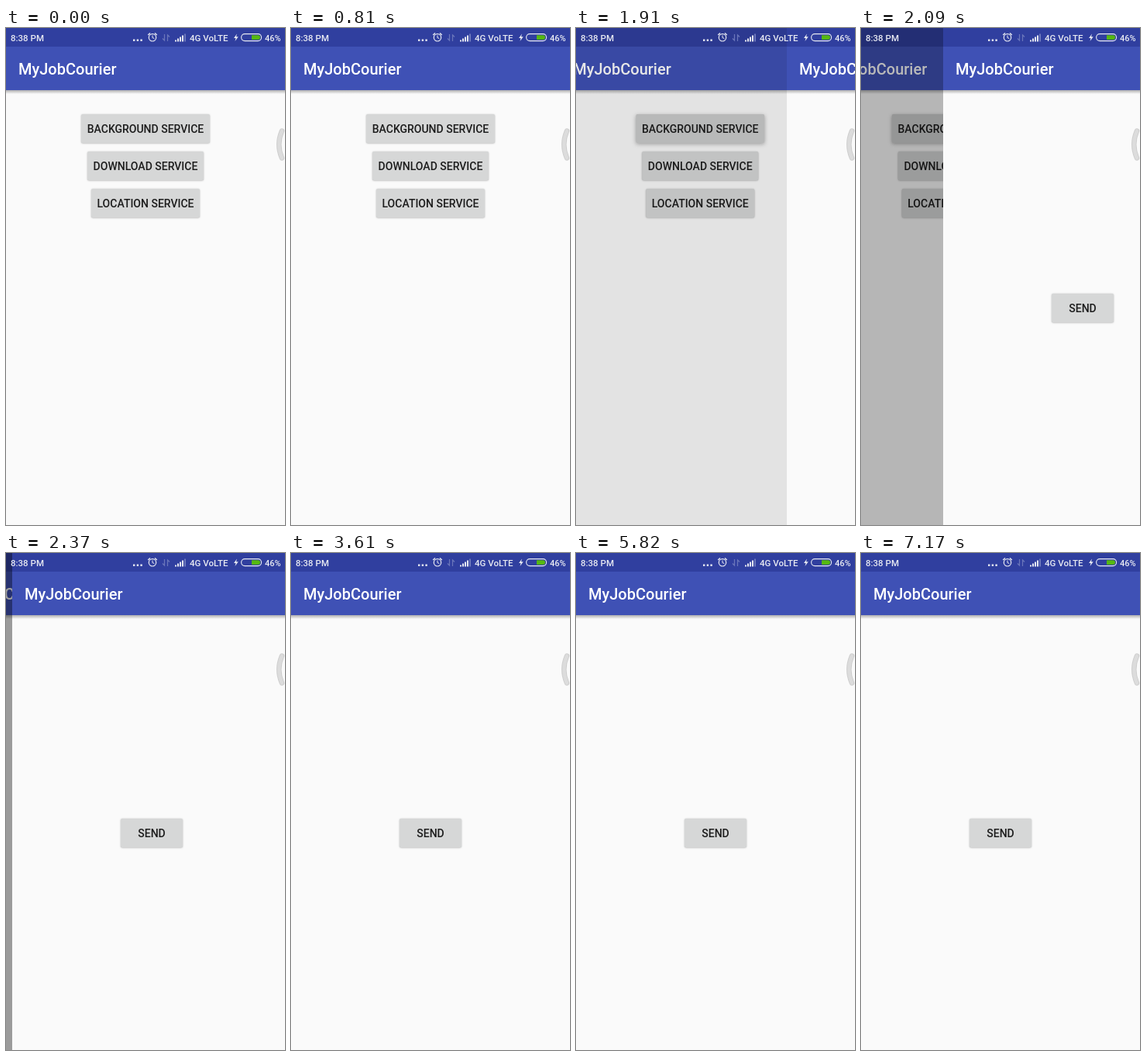
An HTML page with a canvas that plays this animation: 360x640 px, repeating every 8 s.

```html
<!DOCTYPE html>
<html lang="en">
<head>
<meta charset="utf-8">
<title>Service demo</title>
<style>
html, body { margin: 0; width: 100%; height: 100%; overflow: hidden; background: #fafafa; }
canvas { display: block; width: 360px; height: 640px; }
</style>
</head>
<body>
<canvas></canvas>
<script>
const LOOP = 8000, W = 360, H = 640, TITLE = 'MyJobCourier';
const canvas = document.querySelector('canvas'), g = canvas.getContext('2d');
const dpr = window.devicePixelRatio || 1;
canvas.width = W * dpr;
canvas.height = H * dpr;

const clamp = v => Math.max(0, Math.min(1, v));

const home = [
  { label: 'BACKGROUND SERVICE', x: 97, y: 111, w: 166,
    taps: [{ start: 990, end: 2300, grow: 780, cx: 210, reach: 165, lift: 0.6 }] },
  { label: 'DOWNLOAD SERVICE', x: 105, y: 159, w: 150, taps: [] },
  { label: 'LOCATION SERVICE', x: 110, y: 207, w: 140, taps: [] }
];
const sendTap = (start, end, lift) => ({ start, end, grow: 260, cx: 185, reach: 70, lift });
const send = [
  { label: 'SEND', x: 140, y: 342, w: 80,
    taps: [sendTap(3610, 4410, 0.6), sendTap(4430, 5150, 0), sendTap(5250, 5820, 0)] }
];

function rect(x, y, w, h, fill) {
  g.fillStyle = fill;
  g.fillRect(x, y, w, h);
}

function text(s, x, y, font, fill, align = 'left') {
  g.font = font + ' Roboto, sans-serif';
  g.textAlign = align;
  g.fillStyle = fill;
  g.fillText(s, x, y);
}

function line(points, color, width) {
  g.strokeStyle = color;
  g.lineWidth = width;
  g.beginPath();
  points.forEach(([x, y], i) => i ? g.lineTo(x, y) : g.moveTo(x, y));
  g.stroke();
}

function button({ label, x, y, w, taps }, t) {
  const h = 37;
  const tap = taps.find(p => t >= p.start && t < p.end);
  const age = tap ? t - tap.start : 0;
  const press = tap ? Math.min(clamp(age / 120), clamp((tap.end - t) / 300)) : 0;
  const lift = tap ? press * tap.lift : 0;

  g.save();
  g.beginPath();
  g.roundRect(x, y, w, h, 2);
  g.save();
  g.shadowColor = 'rgba(0,0,0,.3)';
  g.shadowBlur = (2 + 5 * lift) * dpr;
  g.shadowOffsetY = (0.6 + 1.4 * lift) * dpr;
  g.fillStyle = '#d6d7d7';
  g.fill();
  g.restore();
  if (tap) {
    g.clip();
    rect(x, y, w, h, `rgba(0,0,0,${0.015 * press})`);
    g.beginPath();
    g.arc(tap.cx, y + h / 2, tap.reach * clamp(age / tap.grow) ** 2, 0, 7);
    g.fillStyle = `rgba(0,0,0,${0.04 * press})`;
    g.fill();
  }
  g.restore();
  text(label, x + w / 2, y + 24, '500 14px', '#1c1c1c', 'center');
}

function page(x, buttons, t) {
  g.save();
  g.translate(x, 0);
  g.beginPath();
  g.rect(0, 0, W, H);
  g.clip();
  rect(0, 0, W, H, '#fafafa');
  const shade = g.createLinearGradient(0, 80, 0, 85);
  shade.addColorStop(0, 'rgba(0,0,0,.3)');
  shade.addColorStop(1, 'rgba(0,0,0,0)');
  rect(0, 80, W, 5, shade);
  rect(0, 24, W, 56, '#3f51b5');
  rect(0, 0, W, 24, '#303f9f');
  text(TITLE, 16, 60, '500 20px', '#fff');
  buttons.forEach(b => button(b, t));
  g.restore();
}

function statusIcons() {
  const ink = '#e8eaf2';
  text('8:38 PM', 6, 16.5, '500 11.5px', ink);
  for (const x of [164, 168.7, 173.4]) rect(x, 14.5, 2.4, 2.4, ink);

  // alarm clock
  g.strokeStyle = ink;
  g.lineWidth = 1.2;
  g.beginPath();
  g.arc(189, 12.3, 4.7, 0, 7);
  g.stroke();
  line([[189, 9.5], [189, 12.5], [191.3, 13.5]], ink, 1);
  line([[183.2, 9], [186, 6.6]], ink, 1.3);
  line([[194.8, 9], [192, 6.6]], ink, 1.3);

  // data arrows
  line([[204.5, 8], [204.5, 16], [202, 13.5]], '#6c77bb', 1.2);
  line([[208.5, 17], [208.5, 9], [211, 11.5]], '#6c77bb', 1.2);

  // signal
  for (let i = 0; i < 5; i++)
    rect(218 + 3 * i, 15.5 - 2 * i, 2, 2 + 2 * i, i < 4 ? ink : '#6c77bb');

  text('4G VoLTE', 237, 16.5, '500 11.5px', ink);

  // charging bolt
  g.fillStyle = ink;
  g.beginPath();
  [[298, 7.5], [294, 13], [296.5, 13], [295.5, 17], [299.7, 11.2], [297, 11.2]]
    .forEach(p => g.lineTo(...p));
  g.fill();

  // battery
  g.beginPath();
  g.roundRect(303.6, 7.6, 26, 9, 4.5);
  g.strokeStyle = ink;
  g.lineWidth = 1.1;
  g.stroke();
  g.beginPath();
  g.roundRect(317, 9.2, 11, 5.8, [0, 2.9, 2.9, 0]);
  g.fillStyle = '#55b812';
  g.fill();

  text('46%', 334, 16.5, '500 11px', ink);
}

function edgeHandle() {
  g.lineCap = 'round';
  for (const [color, width] of [['#cecece', 6.5], ['#dcdcdc', 4.5]]) {
    g.beginPath();
    g.moveTo(356, 132.5);
    g.quadraticCurveTo(348.5, 150, 356, 167.5);
    g.strokeStyle = color;
    g.lineWidth = width;
    g.stroke();
  }
  g.lineCap = 'butt';
}

function draw(t) {
  g.setTransform(dpr, 0, 0, dpr, 0, 0);
  const slide = 1 - (1 - clamp((t - 1846) / 730)) ** 3;
  if (slide < 1) {
    page(-81 * slide, home, t);
    rect(0, 0, W, H, `rgba(0,0,0,${0.39 * slide})`);
  }
  if (slide > 0) page(Math.round(W * (1 - slide)), send, t);
  statusIcons();
  edgeHandle();
}

const begin = performance.now();
function frame() {
  draw((performance.now() - begin) % LOOP);
  requestAnimationFrame(frame);
}
frame();
</script>
</body>
</html>
```
